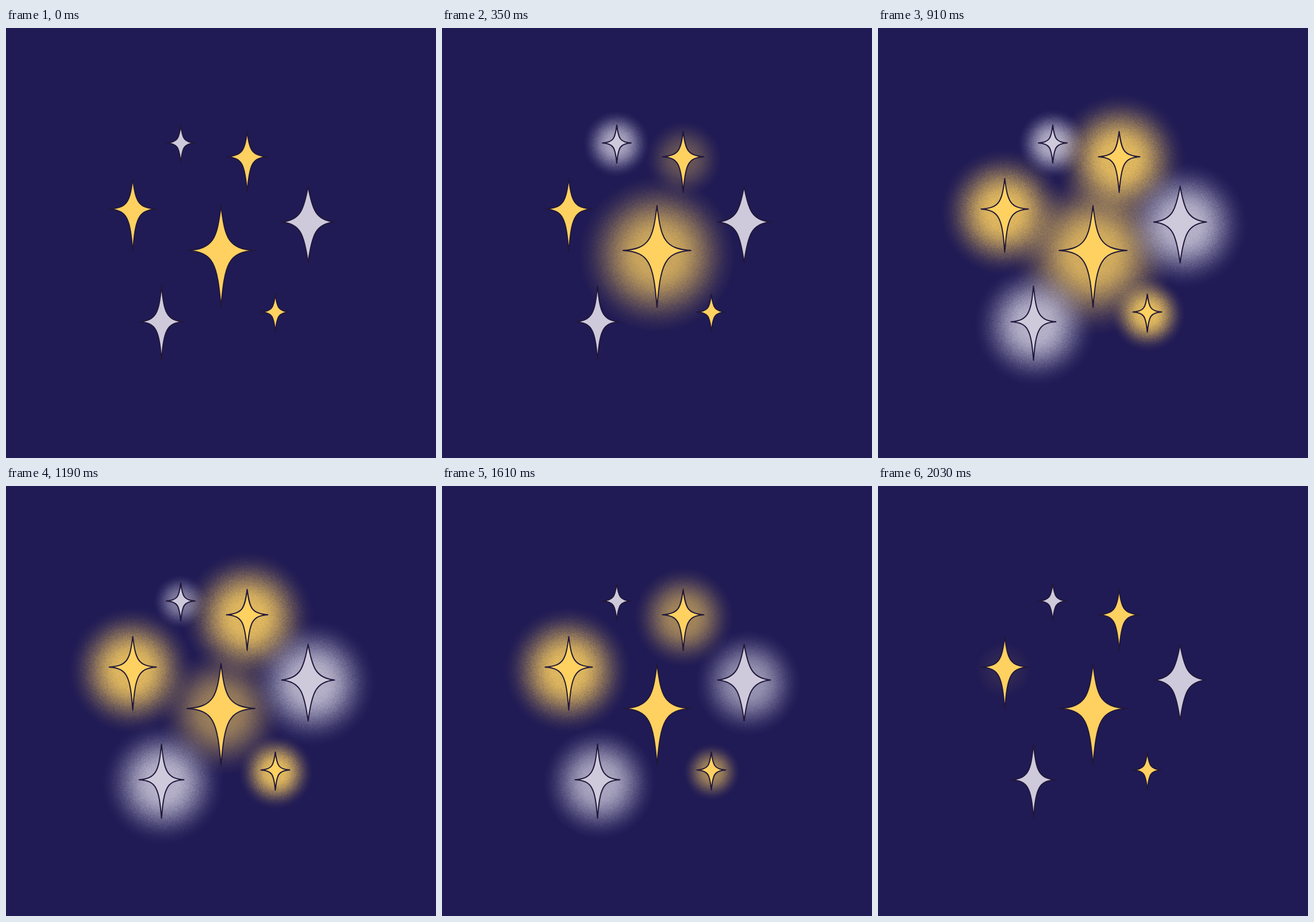
These frames come from a looping animation (748 by 748 pixels, 2100 ms). An HTML page with a canvas:

```html
<!DOCTYPE html>
<html lang="en">
<head>
<meta charset="utf-8">
<title>Glowing stars</title>
<style>
html, body { margin: 0; width: 100%; height: 100%; overflow: hidden; background: #201b55; }
canvas { display: block; width: 748px; height: 748px; }
</style>
</head>
<body>
<canvas id="sky" width="748" height="748"></canvas>
<script>
const LOOP = 2100, STEP = 70;
const GOLD = [255, 209, 96], SILVER = [206, 202, 220];
const ctx = document.getElementById('sky').getContext('2d');

// at: centre; arms: side, up, down; glow: x, y, radius; fade: in from, to, out from, to (ms)
const stars = [
  { color: GOLD, at: [374, 387], arms: [59, 78, 99], glow: [374, 393, 160], fade: [0, 410, 850, 1540] },
  { color: SILVER, at: [304, 200], arms: [25, 31, 35], glow: [303, 201, 68], fade: [70, 400, 850, 1545] },
  { color: GOLD, at: [419.5, 224], arms: [36, 44, 62], glow: [420, 228, 122], fade: [270, 640, 1450, 1810] },
  { color: GOLD, at: [220.5, 315], arms: [41, 53, 75], glow: [218, 320, 117], fade: [580, 900, 1640, 2040] },
  { color: SILVER, at: [525.5, 337.5], arms: [46, 62, 71], plump: 1.35, glow: [532, 342, 117], fade: [480, 850, 1500, 1880] },
  { color: SILVER, at: [270.5, 511], arms: [39, 62, 67], glow: [273, 516, 113], fade: [530, 870, 1560, 1980] },
  { color: GOLD, at: [468.5, 494], arms: [25, 31, 35], glow: [469, 497, 69], fade: [430, 690, 1450, 1810] }
];

const clamp = v => Math.max(0, Math.min(1, v));
const ramp = (t, from, to) => clamp((t - from) / (to - from));

let seed = 7;
function random() {
  seed = (seed * 1664525 + 1013904223) >>> 0;
  return seed / 4294967296;
}

// Soft, slightly grainy disc
function makeGlow(radius, color) {
  const size = radius * 2;
  const canvas = document.createElement('canvas');
  canvas.width = canvas.height = size;
  const c = canvas.getContext('2d');
  const image = c.createImageData(size, size);
  for (let i = 0; i < size * size; i++) {
    const d = Math.hypot(i % size - radius, Math.floor(i / size) - radius) / radius;
    const k = 1 - ramp(d, 0.18, 1);
    const a = 0.85 * (k * k * (3 - 2 * k)) ** 1.2;
    const grain = (random() - 0.5) * 0.6 * a * (1 - a);
    image.data.set([...color, 255 * clamp(a + grain)], i * 4);
  }
  c.putImageData(image, 0, 0);
  return canvas;
}

function makeStar([x, y], [w, up, down], plump = 1) {
  const path = new Path2D();
  const n = w * plump, u = up * plump, d = down * plump;
  const curve = (...p) => path.bezierCurveTo(...p.map((v, i) => v + (i % 2 ? y : x)));
  path.moveTo(x, y - up);
  curve(n * 0.12, -u * 0.25, n * 0.22, -u * 0.04, w, 0);
  curve(n * 0.22, d * 0.03, n * 0.11, d * 0.22, 0, down);
  curve(-n * 0.11, d * 0.22, -n * 0.22, d * 0.03, -w, 0);
  curve(-n * 0.22, -u * 0.04, -n * 0.12, -u * 0.25, 0, -up);
  path.closePath();
  return path;
}

for (const s of stars) {
  s.halo = makeGlow(s.glow[2], s.color);
  s.path = makeStar(s.at, s.arms, s.plump);
}

function draw(t) {
  ctx.globalAlpha = 1;
  ctx.fillStyle = '#201b55';
  ctx.fillRect(0, 0, 748, 748);
  for (const { halo, glow: [x, y, radius], fade: [a, b, c, d] } of stars) {
    // The halo spreads as it brightens
    const level = ramp(t, a, b) * (1 - ramp(t, c, d));
    const r = radius * (0.5 + 0.5 * level);
    ctx.globalAlpha = level ** 0.65;
    ctx.drawImage(halo, x - r, y - r, r * 2, r * 2);
  }
  ctx.globalAlpha = 1;
  ctx.strokeStyle = '#21183a';
  ctx.lineWidth = 2;
  ctx.lineJoin = 'round';
  for (const { path, color } of stars) {
    ctx.fillStyle = `rgb(${color})`;
    ctx.fill(path);
    ctx.stroke(path);
  }
}

const start = performance.now();
function frame() {
  const t = (performance.now() - start) % LOOP;
  draw(Math.floor(t / STEP) * STEP);
  requestAnimationFrame(frame);
}
frame();
</script>
</body>
</html>
```
